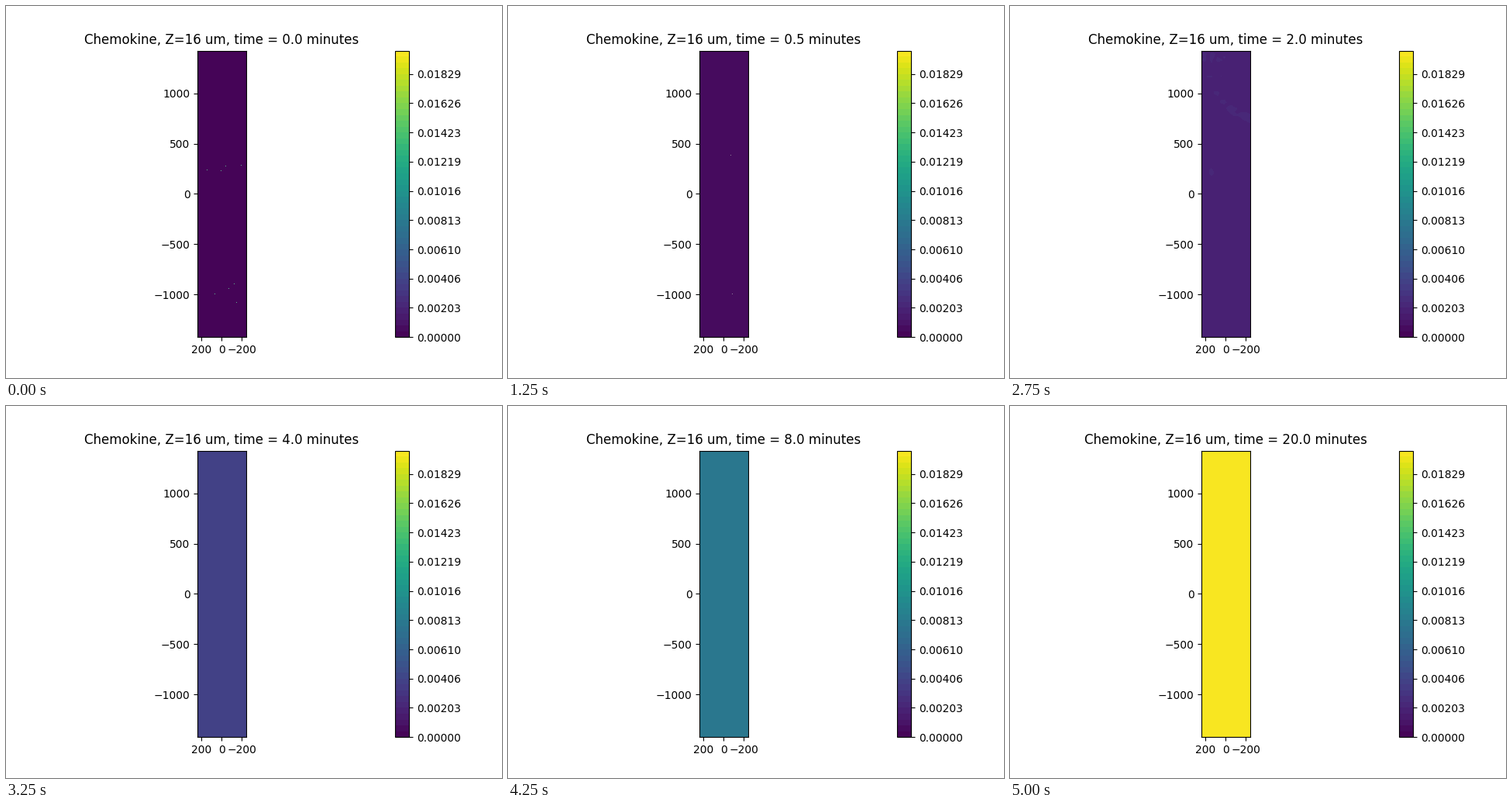
Write a matplotlib script that moves like this. It is 640 px wide and 480 px high and loops after 5.25 s.

```python
import numpy as np
import matplotlib.pyplot as plt
from matplotlib.animation import FuncAnimation

plt.rcParams["text.kerning_factor"] = 6  # whole-pixel glyph spacing

VMAX = 0.019916
RATE = 0.000995  # concentration gained per minute
LEVELS = np.linspace(0, VMAX, 50)
TIMES = [k / 10 for k in range(10)] + list(range(1, 11)) + [20]

X, Y = np.meshgrid(np.arange(-240, 241, 32), np.arange(-1424, 1425, 32))


def bell(d, width):
    return np.exp(-(d / width) ** 2)


# Richer regions: the top edge, a sloping band and a patch on the left
band = np.interp(X, [-240, -30, 100], [750, 850, 1000])
regions = (0.9 * bell(Y - 1360, 75) * bell(X - 120, 160)
           + 0.5 * bell(Y - 1167, 25)
           + bell(Y - band, 50) * (X < 120)
           + 0.9 * bell(X - 145, 35) * bell(Y - 215, 80))
rng = np.random.default_rng(4)
bumps = np.minimum(regions * rng.uniform(0.2, 1.1, X.shape), 1)


def field(t):
    gain = min(0.15 / t ** 1.7, 0.2) if t else 0
    return np.clip(RATE * t * (1 + gain * bumps), 1e-7, 0.0199)


def fill(t):
    return ax.contourf(X, Y, field(t), levels=LEVELS, cmap="viridis")


def specks(points, color):
    return ax.plot(*zip(*points), ",", color=color, zorder=2)[0]


fig, ax = plt.subplots(figsize=(6.4, 4.8), dpi=100)
layer = fill(0)
fig.colorbar(layer, ax=ax, ticks=LEVELS[::5], format="%.5f")
ax.set_aspect("equal")
ax.set_anchor("C")
ax.set_xlim(240, -240)
ax.set_ylim(-1424, 1424)
ax.set_xticks([200, 0, -200])
ax.set_yticks(range(-1000, 1001, 500))
title = ax.set_title("")

sources = specks([(153, 238), (7, 223), (-32, 269),
                  (69, -995), (-70, -941), (-124, -895)], "#5fae8f")
brief = specks([(-186, 277), (-140, -1087)], "#5fae8f")
late = specks([(-70, 377), (-78, -995)], "#8d7f98")


def draw(i):
    global layer
    t = TIMES[i]
    layer.remove()
    layer = fill(t)
    title.set_text(f"Chemokine, Z=16 um, time = {t:.1f} minutes")
    sources.set_visible(t < 0.4)
    brief.set_visible(t == 0)
    late.set_visible(0.5 <= t <= 0.6)
    return [title, sources, brief, late]


anim = FuncAnimation(fig, draw, frames=len(TIMES), interval=250, repeat=True,
                     repeat_delay=0, init_func=lambda: [], blit=False)
plt.show()
```
